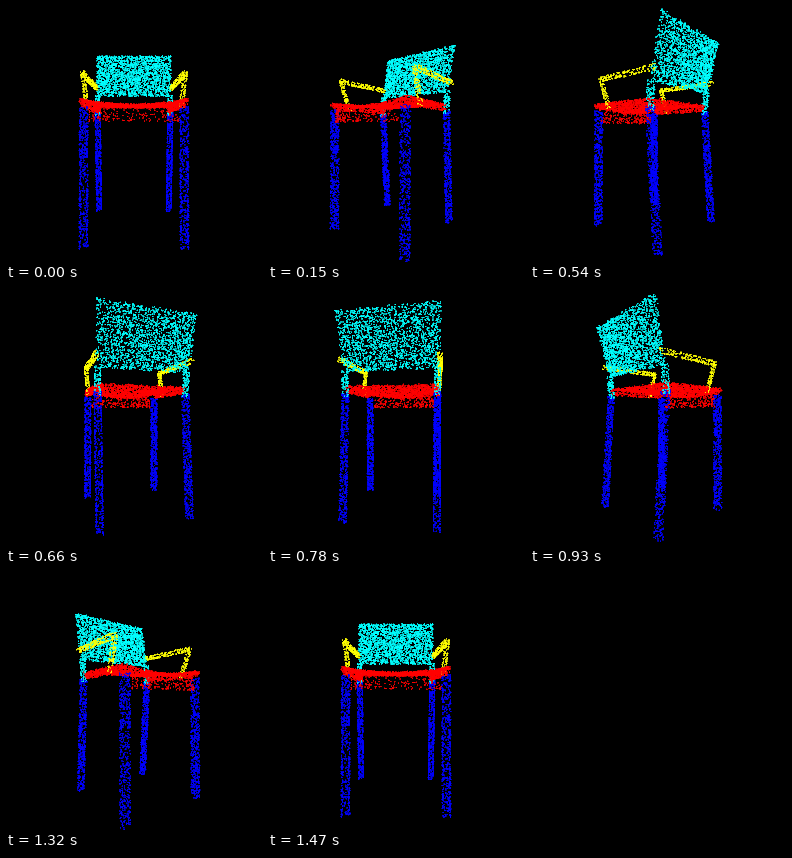
Write an HTML page with a canvas that moves like this. It is 256x256 px and loops after 1.5 s.

```html
<!DOCTYPE html>
<html lang="en">
<head>
<meta charset="utf-8">
<title>Rotating chair point cloud</title>
<style>
  html, body { margin: 0; width: 100%; height: 100%; overflow: hidden; background: #000; }
  canvas { display: block; width: 100vw; height: 100vh; image-rendering: pixelated; }
</style>
</head>
<body>
<canvas id="view" width="256" height="256"></canvas>
<script>
const SIZE = 256;
const ctx = document.getElementById('view').getContext('2d');
const image = ctx.createImageData(SIZE, SIZE);
const buffer = new Float32Array(SIZE * SIZE * 3);

const STEP = 30, FRAMES = 50;            // the last frame completes the turn
const CX = 128, HORIZON = 122, DIST = 221.7;
const RADIUS = 0.9, FADE = 0.55;         // dot size and how much it dims at its edge
const BLUE = [0, 0, 255], RED = [255, 0, 0], CYAN = [0, 255, 255], YELLOW = [255, 255, 0];

let seed = 20731;
function rnd() {
  seed = (seed + 0x6D2B79F5) | 0;
  let r = Math.imul(seed ^ (seed >>> 15), 1 | seed);
  r = (r + Math.imul(r ^ (r >>> 7), 61 | r)) ^ r;
  return ((r ^ (r >>> 14)) >>> 0) / 4294967296;
}
const spread = r => (rnd() * 2 - 1) * r;
const mix = (a, b, t) => a + (b - a) * t;

// Model axes: x right, y up from eye level, z toward the viewer.
const points = [];
const add = (x, y, z, color) => points.push({ x, y, z, color });

// Random point on the outline of a square of half size r
function rim(r) {
  const side = rnd() < 0.5 ? -r : r, along = spread(r);
  return rnd() < 0.5 ? [side, along] : [along, side];
}

// Bar from a to b; flat bars have their cross-section in x/y, upright ones in x/z
function bar(a, b, r, n, color, flat) {
  for (let i = 0; i < n; i++) {
    const t = rnd(), [u, v] = rim(r);
    add(mix(a[0], b[0], t) + u,
        mix(a[1], b[1], t) + (flat ? v : 0),
        mix(a[2], b[2], t) + (flat ? 0 : v), color);
  }
}

function build() {
  for (const s of [-1, 1]) {
    bar([s * 40.5, 17, 43], [s * 40.5, -96.5, 43.5], 2.9, 540, BLUE);
    bar([s * 41, 17, -29], [s * 40.5, -96.5, -36.4], 2.6, 500, BLUE);
    bar([s * 41, 14, -28.5], [s * 41.3, 37, -30.5], 2.2, 85, CYAN);
    bar([s * 43.5, 46.5, 34], [s * 43, 46, -37], 1.9, 150, YELLOW, true);
    bar([s * 43.5, 47, 34], [s * 42, 18, 24], 1.6, 80, YELLOW);
    for (let i = 0; i < 240; i++) {
      const t = rnd();
      add(s * mix(39, 42, t) + spread(1.8), mix(17, 24, rnd()), mix(-30, 44, t), RED);
    }
  }

  // Backrest, leaning away
  for (let i = 0; i < 2000; i++) {
    const t = rnd();
    add(spread(mix(42.8, 44.3, t)), mix(36, 86, t),
        mix(-31, -43, t ** 1.15) + spread(1.3), CYAN);
  }

  // Seat, dished toward the front
  for (let i = 0; i < 1250; i++) {
    const t = rnd(), u = spread(1);
    const dip = 4.5 * (1 - u * u) * t;
    add(u * mix(41, 43.5, t), 24 - dip - rnd() * 1.5, mix(-30, 46, t), RED);
  }

  // Front edge and apron
  for (let i = 0; i < 190; i++) {
    const u = spread(1);
    add(u * 43.5, 23.5 - 4.5 * (1 - u * u) - rnd() * 2.5, 46, RED);
  }
  for (let i = 0; i < 210; i++) {
    const u = spread(1);
    add(u * 36, mix(5, 19, rnd()), 45.5 + 4 * (1 - u * u), RED);
  }
}

// Blend one soft round dot over the buffer
function dot(px, py, color) {
  for (let y = Math.ceil(py - RADIUS - 0.5); y + 0.5 <= py + RADIUS; y++) {
    for (let x = Math.ceil(px - RADIUS - 0.5); x + 0.5 <= px + RADIUS; x++) {
      const d = ((x + 0.5 - px) ** 2 + (y + 0.5 - py) ** 2) / RADIUS ** 2;
      if (d > 1 || x < 0 || y < 0 || x >= SIZE || y >= SIZE) continue;
      const at = (y * SIZE + x) * 3, alpha = 1 - FADE * d;
      for (let k = 0; k < 3; k++) buffer[at + k] = mix(buffer[at + k], color[k], alpha);
    }
  }
}

function draw(angle) {
  const c = Math.cos(angle), s = Math.sin(angle);
  for (const p of points) p.depth = p.x * s + p.z * c;
  points.sort((a, b) => a.depth - b.depth);

  buffer.fill(0);
  for (const p of points) {
    const k = DIST / (DIST - p.depth);
    dot(CX + (p.x * c - p.z * s) * k, HORIZON - p.y * k, p.color);
  }
  for (let i = 0; i < SIZE * SIZE; i++) {
    for (let k = 0; k < 3; k++) image.data[i * 4 + k] = buffer[i * 3 + k];
    image.data[i * 4 + 3] = 255;
  }
  ctx.putImageData(image, 0, 0);
}

let shown = -1;
function tick() {
  const frame = Math.floor(performance.now() / STEP) % FRAMES;
  if (frame !== shown) {
    shown = frame;
    draw(frame / (FRAMES - 1) * Math.PI * 2);
  }
  requestAnimationFrame(tick);
}

build();
tick();
</script>
</body>
</html>
```
